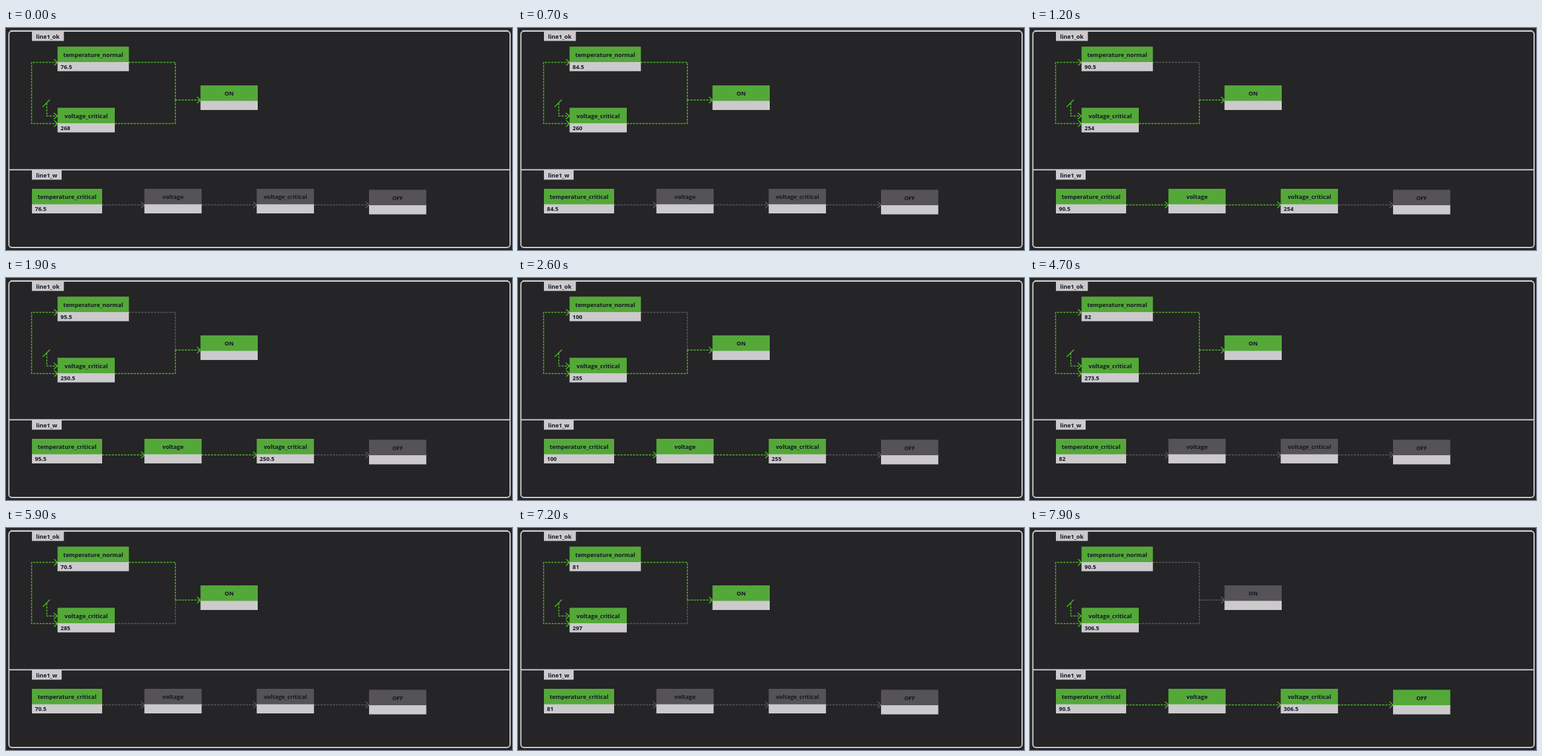
These frames come from a looping animation (800x352 px, 8000 ms). An HTML page:

```html
<!DOCTYPE html>
<html lang="en">
<head>
<meta charset="utf-8">
<title>Ladder logic monitor</title>
<style>
  html, body { margin: 0; width: 100%; height: 100%; overflow: hidden; background: #252426; }
  svg { display: block; }
  text { font: 700 9.1px "Open Sans", "Noto Sans", sans-serif; fill: #121728; }
  .light { fill: #cccacc; }
  .head { fill: #555356; }
  .wire { fill: none; stroke: #5c5a5c; stroke-width: 1.5; }
  .dash { stroke-dasharray: 3.4 1.6; }
  .on .head { fill: #54a838; }
  .on .wire { stroke: #4db52c; }
  .frame { fill: none; stroke: #cccacc; stroke-width: 2; }
</style>
</head>
<body>
<svg id="stage" width="800" height="352" viewBox="0 0 800 352">
  <rect class="frame" x="4.5" y="5" width="792.5" height="343" rx="5"/>
  <path class="frame" d="M7 4.5H794M4.5 224.7H797"/>
</svg>
<script>
const stage = document.getElementById("stage");

function add(parent, tag, attrs, text = "") {
  const el = document.createElementNS("http://www.w3.org/2000/svg", tag);
  for (const key in attrs) el.setAttribute(key, attrs[key]);
  el.textContent = text;
  return parent.appendChild(el);
}

function title(y, width, text) {
  add(stage, "rect", { class: "light", x: 41, y, width, height: 15.5 });
  add(stage, "text", { x: 47.5, y: y + 12.2 }, text);
}

function wire(d, tip) {
  const group = add(stage, "g", {});
  add(group, "path", { class: "wire dash", d });
  if (tip) {
    const [x, y] = tip;
    add(group, "path", { class: "wire", d: `M${x - 5.5} ${y - 5}L${x} ${y}L${x - 5.5} ${y + 5}` });
  }
  return group;
}

function node(x, y, width, name) {
  const group = add(stage, "g", {});
  add(group, "rect", { class: "light", x, y: y + 24, width, height: 15 });
  add(group, "rect", { class: "head", x, y, width, height: 24.5 });
  add(group, "text", { x: x + width / 2, y: y + 16, "text-anchor": "middle" }, name);
  const value = add(group, "text", { x: x + 4.7, y: y + 35.4 });
  return { group, value };
}

title(5, 50.5, "line1_ok");
title(225, 47, "line1_w");

const inputs = wire("M81 54.5H40.5V151.5H81", [81.5, 54.5]);
const inputTip = wire("", [81.5, 151.5]);
const inverter = wire("M64.5 119V139.5H81", [81, 139.5]);
add(inverter, "path", { class: "wire", d: "M58 125L69.5 113.5" });
const normalOut = wire("M194 54.5H267.7V114");
const voltageOut = wire("M172 151.5H267.7V114");
const okOut = wire("M267.7 114.2H307", [307.5, 114.2]);
const toVoltage = wire("M152 280.5H219", [219, 280.5]);
const toCritical = wire("M309 280.5H396", [396.5, 280.5]);
const toOff = wire("M487 280.5H574", [574, 280.5]);

const normal = node(81.5, 29.5, 112.8, "temperature_normal");
const lowVoltage = node(81.5, 126.5, 90.5, "voltage_critical");
const onNode = node(307.5, 91, 90.5, "ON");
const hot = node(41, 255, 111, "temperature_critical");
const voltage = node(218.8, 255, 90.5, "voltage");
const highVoltage = node(396.4, 255, 90.5, "voltage_critical");
const offNode = node(574, 256.5, 90.5, "OFF");

const light = (on, ...groups) => groups.forEach(g => g.classList.toggle("on", on));
light(true, inputs, inputTip, inverter, normal.group, lowVoltage.group, hot.group);

// The sensors advance at an uneven pace: [time, ticks so far].
const pace = [[0, 0], [1200, 28], [2600, 47], [3700, 65], [4700, 84], [7200, 131], [7900, 150]];

function ticksAt(time) {
  const i = pace.findIndex(([t]) => t > time);
  if (i < 0) return pace[pace.length - 1][1];
  const [t0, n0] = pace[i - 1], [t1, n1] = pace[i];
  return Math.round(n0 + (n1 - n0) * (time - t0) / (t1 - t0));
}

function draw(now) {
  const n = ticksAt(Math.floor(now % 8000 / 100) * 100);

  // Both values move by 0.5 per tick and rest for one tick when they turn.
  const phase = (n + 13) % 122;
  const temp = 70 + Math.min(phase, 121 - phase) / 2;
  const volts = 250 + (Math.abs(n - 36.5) - 0.5) / 2;
  const isHot = temp >= 90, isHigh = volts >= 280;

  normal.value.textContent = hot.value.textContent = temp;
  lowVoltage.value.textContent = volts;
  highVoltage.value.textContent = isHot ? volts : "";

  light(!isHot, normalOut);
  light(!isHigh, voltageOut);
  light(!isHot || !isHigh, okOut, onNode.group);
  light(isHot, toVoltage, voltage.group, toCritical, highVoltage.group);
  light(isHot && isHigh, toOff, offNode.group);
  requestAnimationFrame(draw);
}
draw(0);
</script>
</body>
</html>
```
